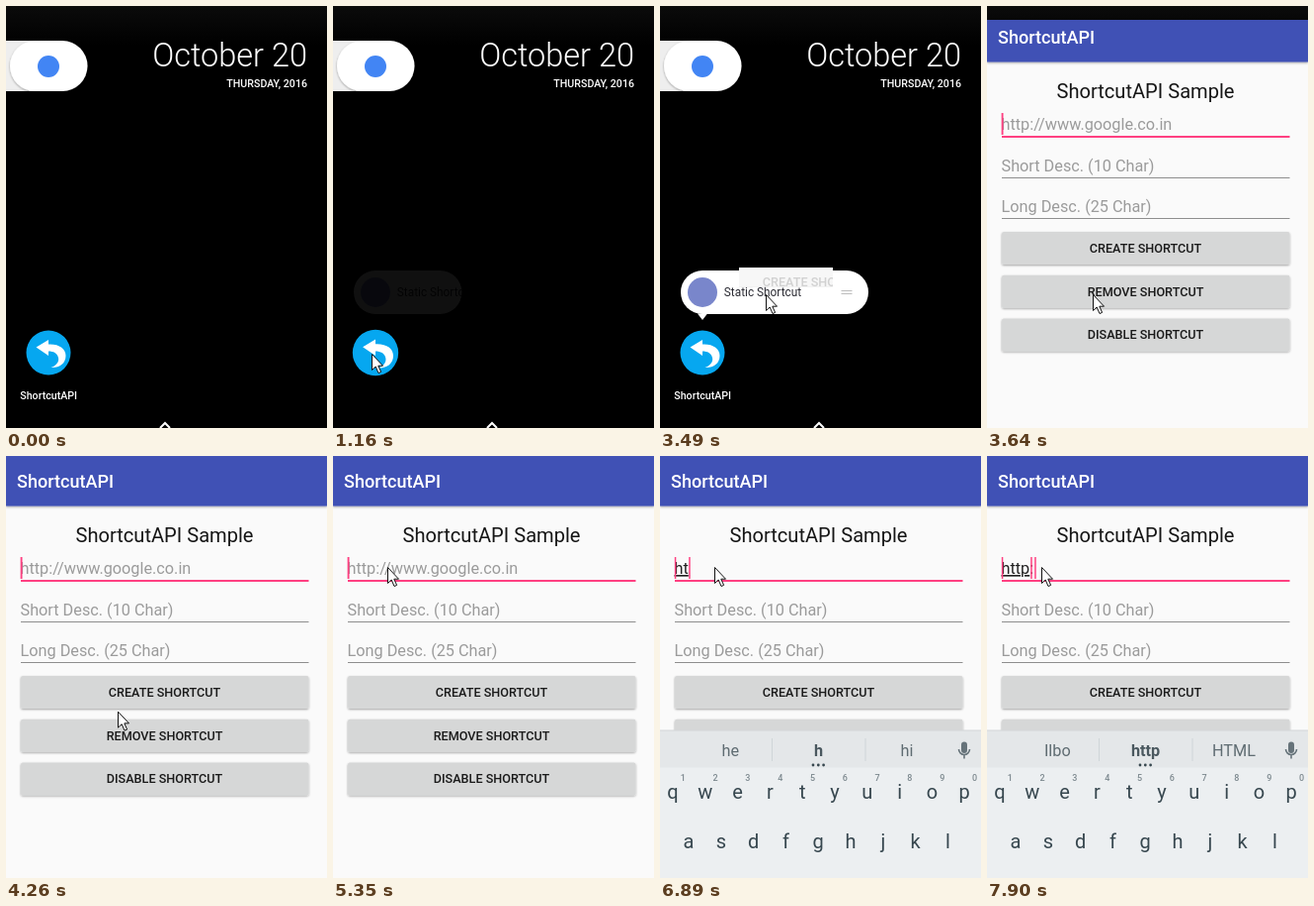
Write an HTML page that moves like this. It is 325x426 px and loops after 7.99 s.

```html
<!DOCTYPE html>
<html lang="en">
<head>
<meta charset="utf-8">
<title>Launcher shortcut demo</title>
<style>
html, body { margin: 0; width: 100%; height: 100%; overflow: hidden; background: #000; }
svg { display: block; width: 100vw; height: 100vh; font-family: Roboto, sans-serif; }
.mid { text-anchor: middle; }
.end { text-anchor: end; }
.field { font-size: 16.25px; }
.hint { fill: #9b9b9b; }
.button { font-size: 12.64px; font-weight: 500; fill: #1a1a1a; }
.key { font-size: 20px; fill: #37474f; }
.digit { font-size: 9px; font-weight: 500; fill: #7d898f; }
#word { fill: #212121; text-decoration: underline; text-decoration-thickness: 1px; text-underline-offset: 2px; }
</style>
</head>
<body>
<svg viewBox="0 0 325 426" preserveAspectRatio="none">
  <defs>
    <linearGradient id="top" x2="0" y2="1"><stop stop-color="#0b0b0b"/><stop offset="1"/></linearGradient>
    <filter id="soft" x="-10%" y="-20%" width="120%" height="150%">
      <feDropShadow dx="0" dy="1" stdDeviation="1" flood-opacity=".35"/>
    </filter>
    <clipPath id="popupClip"><rect id="popupMask" x="21" y="267" height="44" rx="22"/></clipPath>
    <clipPath id="appClip"><rect id="appMask"/></clipPath>
  </defs>

  <g id="home">
    <rect width="325" height="426"/>
    <rect width="325" height="40" fill="url(#top)"/>
    <rect y="35" width="50" height="51" fill="#eee"/>
    <rect x="4" y="35" width="78.5" height="51" rx="25.5" fill="#fff" filter="url(#soft)"/>
    <circle cx="43" cy="61" r="11" fill="#4285f4"/>
    <g fill="#fff" class="end">
      <text x="305" y="61" font-size="32.5" font-weight="300">October 20</text>
      <text x="305" y="82" font-size="10.65" font-weight="500">THURSDAY, 2016</text>
    </g>
    <path d="M156 426l5-5 5 5" fill="none" stroke="#fff" stroke-width="2"/>
    <g id="icon">
      <circle cx="43" cy="350" r="22.5" fill="#06a7f0"/>
      <path d="M30.5 344.5L43 337V341.5C54 341 60.5 346 60.5 353C60.5 361 54 365.5 45.5 365C51 363 54 359 53 355C52 350.5 48 348.5 43 348.5V353Z" fill="#fff"/>
    </g>
    <text id="label" x="43.2" y="397" class="mid" font-size="10.65" font-weight="500" fill="#fff">ShortcutAPI</text>
    <g id="popup">
      <path id="pointer" d="M38 310.5h10l-5 6.5z" fill="#fff"/>
      <g clip-path="url(#popupClip)">
        <rect x="21" y="267" width="190" height="44" fill="#fff"/>
        <circle cx="43" cy="289" r="15" fill="#7986cb"/>
        <text x="64.8" y="293" font-size="11.85" fill="#2b2b33">Static Shortcut</text>
        <path d="M183.5 287.5h11m-11 3h11" stroke="#bdbdbd"/>
      </g>
    </g>
  </g>

  <g id="app" clip-path="url(#appClip)">
    <rect width="325" height="426" fill="#fafafa"/>
    <g id="page">
      <rect y="-40" width="325" height="90.5" fill="#3f51b5" filter="url(#soft)"/>
      <text x="11" y="32" font-size="18.06" font-weight="500" fill="#fff">ShortcutAPI</text>
      <text x="160.5" y="87" class="mid" font-size="20.1" fill="#161616">ShortcutAPI Sample</text>
      <g class="field hint">
        <text id="hint" x="14.5" y="119">http://www.google.co.in</text>
        <text x="14.5" y="160.5">Short Desc. (10 Char)</text>
        <text x="14.5" y="202">Long Desc. (25 Char)</text>
      </g>
      <path d="M15 126h291.5" stroke="#ff4081" stroke-width="1.8"/>
      <path d="M15 167.5h291.5M15 208.5h291.5" stroke="#8e8e8e"/>
      <text id="word" class="field" x="14.5" y="119"></text>
      <text id="colon" class="field" x="43.3" y="119" fill="#212121">:</text>
      <g id="carets" fill="#ff4081">
        <rect x="14.8" y="102" width="1.5" height="22"/>
        <rect x="44.2" y="102" width="1.5" height="22"/>
        <rect id="caret" y="102" width="1.5" height="22"/>
      </g>
      <g id="buttons"></g>
    </g>
    <rect id="veil" width="325" height="426" fill="#fff"/>
    <g id="keyboard">
      <rect y="277" width="325" height="149" fill="#eceff1"/>
      <rect y="277" width="325" height="37.5" fill="#e4e7e9"/>
      <path d="M0 277h325" stroke="#d3d6d8"/>
      <text id="notice" x="161" y="302" class="mid" font-size="13.65" fill="#45535a">Suggest contact names? Touch for info.</text>
      <g id="words" class="field mid" fill="#5f6c72">
        <path d="M113.5 285v23m94.5-23v23" stroke="#cfd5d8"/>
        <text x="71.3" y="303"></text>
        <text x="160.5" y="303" font-weight="700" fill="#4a585f"></text>
        <text x="250" y="303"></text>
        <g fill="#37474f"><circle cx="155" cy="312" r="1.4"/><circle cx="160.3" cy="312" r="1.4"/><circle cx="165.6" cy="312" r="1.4"/></g>
      </g>
      <rect x="305" y="288.5" width="6" height="11.5" rx="3" fill="#66737a"/>
      <path d="M302.5 296a5.5 5.5 0 0 0 11 0M308 301.5v4" fill="none" stroke="#66737a" stroke-width="1.6"/>
    </g>
  </g>

  <path id="pointerArrow" d="M.5 .5V16.5L4.2 13L7 19.5L9.6 18.4L6.8 12.2H11.5Z" fill="#fff" stroke="#111" stroke-linejoin="round"/>
</svg>
<script>
const $ = id => document.getElementById(id);
const set = (id, attrs) => { for (const k in attrs) $(id).setAttribute(k, attrs[k]); };
const show = (id, on) => set(id, { visibility: on ? 'visible' : 'hidden' });

// Linear interpolation through rows of [time, ...values]
function track(rows, t) {
  const i = rows.findIndex(r => r[0] > t);
  if (i === 0) return rows[0].slice(1);
  if (i < 0) return rows[rows.length - 1].slice(1);
  const a = rows[i - 1], b = rows[i], p = (t - a[0]) / (b[0] - a[0]);
  return a.slice(1).map((v, k) => v + (b[k + 1] - v) * p);
}
// Last row whose time has come
const latest = (rows, t) => rows.filter(r => r[0] <= t).pop().slice(1);

const text = (cls, x, y, s) => `<text class="${cls} mid" x="${x}" y="${y}">${s}</text>`;
$('buttons').innerHTML = ['CREATE', 'REMOVE', 'DISABLE'].map((verb, i) => {
  const y = 222 + i * 43.7;
  return `<rect x="15" y="${y}" width="291.5" height="33" rx="2" fill="#d6d7d7" filter="url(#soft)"/>` +
    text('button', 160.5, y + 21, verb + ' SHORTCUT');
}).join('');
$('keyboard').insertAdjacentHTML('beforeend',
  [...'qwertyuiop'].map((c, i) => {
    const x = 13 + i * 32.8;
    return text('key', x, 346, c) + text('digit', x + 10.3, 328, (i + 1) % 10);
  }).join('') +
  [...'asdfghjkl'].map((c, i) => text('key', 29 + i * 32.8, 396, c)).join(''));

const LOOP = 7990;
const mouse = [
  [100, 86, 430], [140, 77, 415], [290, 46, 384], [410, 20, 360], [520, 39, 351],
  [1950, 39, 351], [2240, 107, 304], [2350, 107, 304], [2560, 107, 291],
  [4200, 107, 291], [4260, 113, 258], [4340, 114, 231],
  [4430, 114, 231], [4640, 104, 203], [4950, 70, 136], [5180, 55, 112]
];
const popup = [ // width, opacity
  [1000, 44, 0], [1160, 109, .06], [1240, 142, .4], [1390, 190, 1]
];
const reveal = [ // left, top, right, bottom, page shift, veil
  [0, 80, 264, 175, 283.5, 40, .8], [3570, 25, 110, 275, 390, 18, .3],
  [3640, 0, 14, 325, 426, 6, 0], [3720, 0, 2, 325, 426, 1.5, 0], [3800, 0, 0, 325, 426, 0, 0]
];
const typed = [[0, ''], [6510, 'h'], [6890, 'ht'], [6970, 'htt'], [7140, 'http']];
const blink = [[0, true], [4570, false], [5100, true]];
const guesses = [[0, 'he', 'h', 'hi'], [7290, 'Ilbo', 'http', 'HTML']];

function draw(t) {
  const [mx, my] = track(mouse, t);
  set('pointerArrow', { transform: `translate(${mx} ${my})` });
  show('pointerArrow', t >= 140);

  const [grow] = track([[900, 1], [1000, 1.03], [2010, 1.03], [2160, 1]], t);
  set('icon', { transform: `translate(43 350) scale(${grow}) translate(-43 -350)` });
  const [label] = track([[900, 1], [1000, 0], [2000, 0], [2160, 1]], t);
  set('label', { opacity: label });

  const [width, alpha] = track(popup, t);
  set('popupMask', { width });
  set('popup', { opacity: alpha });
  show('pointer', t >= 1310);

  const [x, y, right, bottom, shift, veil] = latest(reveal, t);
  set('app', { display: t < 3490 ? 'none' : 'inline' });
  set('appMask', { x, y, width: right - x, height: bottom - y });
  set('page', { transform: `translate(0 ${shift})` });
  set('veil', { opacity: veil });

  const [word] = latest(typed, t);
  $('word').textContent = word;
  $('word').style.textDecorationColor = t < 6660 ? 'transparent' : '#212121';
  set('hint', { display: word ? 'none' : 'inline' });
  set('colon', { display: t < 7750 ? 'none' : 'inline' });
  const ends = [15, 24, 29.4, 34.7, 44.2];
  set('caret', { x: t >= 7900 ? 48.2 : ends[word.length] - .2 });
  set('carets', { display: latest(blink, t)[0] ? 'inline' : 'none' });
  $('carets').children[1].setAttribute('display', t >= 7900 ? 'inline' : 'none');

  const [slide] = track([[5690, 149], [5740, 110], [5820, 45], [5900, 10], [5970, 0]], t);
  set('keyboard', { transform: `translate(0 ${slide})`, display: t < 5740 ? 'none' : 'inline' });
  const guessing = t >= 6660;
  set('notice', { display: guessing ? 'none' : 'inline' });
  set('words', { display: guessing ? 'inline' : 'none' });
  const list = latest(guesses, t);
  $('words').querySelectorAll('text').forEach((el, i) => el.textContent = list[i]);
}

const start = performance.now();
function tick() {
  draw((performance.now() - start) % LOOP);
  requestAnimationFrame(tick);
}
tick();
</script>
</body>
</html>
```
